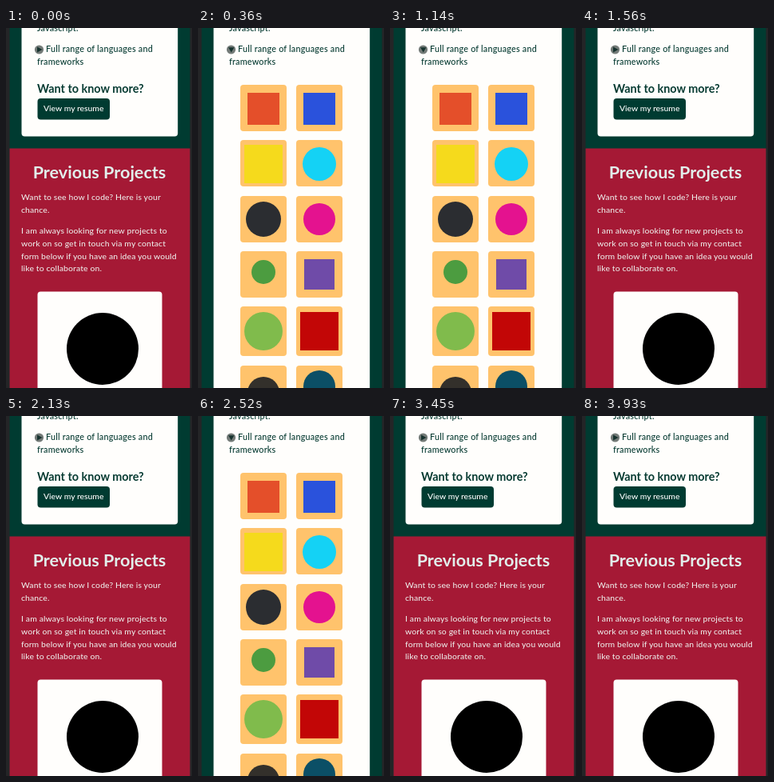
Recreate the animation shown at these times as an HTML page. Size 233 px wide and 450 px high, loop 3960 ms.

```html
<!DOCTYPE html>
<html lang="en">
<head>
<meta charset="utf-8">
<title>Portfolio</title>
<style>
html, body { margin: 0; width: 100%; height: 100%; overflow: hidden; background: #242527; }
svg { display: block; width: 233px; height: 450px; }
text { font: 500 10.8px Lato, sans-serif; letter-spacing: .2px; fill: #073b32; }
.light text { font-size: 10.4px; letter-spacing: .13px; fill: #ece9e7; }
text.button { font-size: 10.4px; letter-spacing: 0; fill: #fff; }
text.sub { font-size: 14.4px; font-weight: 700; letter-spacing: 0; }
text.title { font-size: 21.6px; font-weight: 700; letter-spacing: 0; text-anchor: middle; fill: #e2efeb; }
.tile { fill: #ffc36c; }
.closed { animation: hide 3.96s step-end infinite; }
.open { visibility: hidden; animation: show 3.96s step-end infinite; }
/* toggles at 60, 1200, 2340 and 3420 ms */
@keyframes show {
  0%, 30.3%, 86.36% { visibility: hidden; }
  1.51%, 59.09% { visibility: visible; }
}
@keyframes hide {
  0%, 30.3%, 86.36% { visibility: visible; }
  1.51%, 59.09% { visibility: hidden; }
}
</style>
</head>
<body>
<svg viewBox="0 0 233 450">
  <rect x="4.5" width="226" height="450" fill="#003b31"/>

  <g class="closed">
    <rect x="19.5" y="-10" width="195.7" height="145.5" rx="4" fill="#fffefc"/>
    <text class="sub" x="39" y="81">Want to know more?</text>
    <rect x="39.5" y="88" width="90.5" height="26.5" rx="4" fill="#003b31"/>
    <text class="button" x="47" y="104">View my resume</text>
    <rect x="4.5" y="150.5" width="226" height="300" fill="#a51935"/>
    <text class="title" x="117" y="188">Previous Projects</text>
    <g class="light">
      <text x="19" y="215">Want to see how I code? Here is your</text>
      <text x="19" y="231">chance.</text>
      <text x="19" y="257">I am always looking for new projects to</text>
      <text x="19" y="273">work on so get in touch via my contact</text>
      <text x="19" y="289">form below if you have an idea you would</text>
      <text x="19" y="304">like to collaborate on.</text>
    </g>
    <rect x="39.5" y="329.5" width="156" height="140" rx="4" fill="#fffefc"/>
    <circle cx="121" cy="401" r="45"/>
  </g>

  <g class="open">
    <rect x="19.5" width="195.7" height="450" fill="#fffefc"/>
    <g id="tiles"></g>
  </g>

  <text x="39" y="4">Javascript.</text>
  <text x="50" y="30">Full range of languages and</text>
  <text x="39" y="46">frameworks</text>
  <circle cx="41.5" cy="27" r="5.6" fill="#747b78"/>
  <path class="closed" d="M39 23.5L45.5 27L39 30.5Z" fill="#17332e"/>
  <path class="open" d="M38 24.2H45.4L41.7 30.4Z" fill="#17332e"/>
</svg>
<script>
const tiles = document.getElementById('tiles');

function add(tag, attrs) {
  const el = document.createElementNS('http://www.w3.org/2000/svg', tag);
  for (const key in attrs) el.setAttribute(key, attrs[key]);
  tiles.append(el);
}

// shape, colour, half size, vertical centre
const icons = [
  ['square', '#e44f2a', 20, 101], ['square', '#2a52dc', 20, 101],
  ['square', '#f5da1c', 24, 170], ['circle', '#14d2f5', 21, 170],
  ['circle', '#2b2d31', 22, 239], ['circle', '#e4128f', 20, 239],
  ['circle', '#4c9c40', 15, 305], ['square', '#6f4ba8', 19, 308],
  ['circle', '#80bb4c', 24, 379], ['square', '#c20606', 24, 379],
  ['circle', '#33302b', 20, 456], ['circle', '#0b4f66', 20, 448]
];

icons.forEach(([shape, fill, r, cy], i) => {
  const row = i >> 1, x = i % 2 ? 123 : 53, cx = x + 29;
  add('rect', { class: 'tile', x, y: 71 + Math.round(row * 69.3) + (row > 4 ? 4 : 0),
    width: 58, height: row === 4 ? 62 : 58, rx: 4 });
  if (shape === 'circle') add('circle', { cx, cy, r, fill });
  else add('rect', { x: cx - r, y: cy - r, width: 2 * r, height: 2 * r, fill });
});
</script>
</body>
</html>
```
